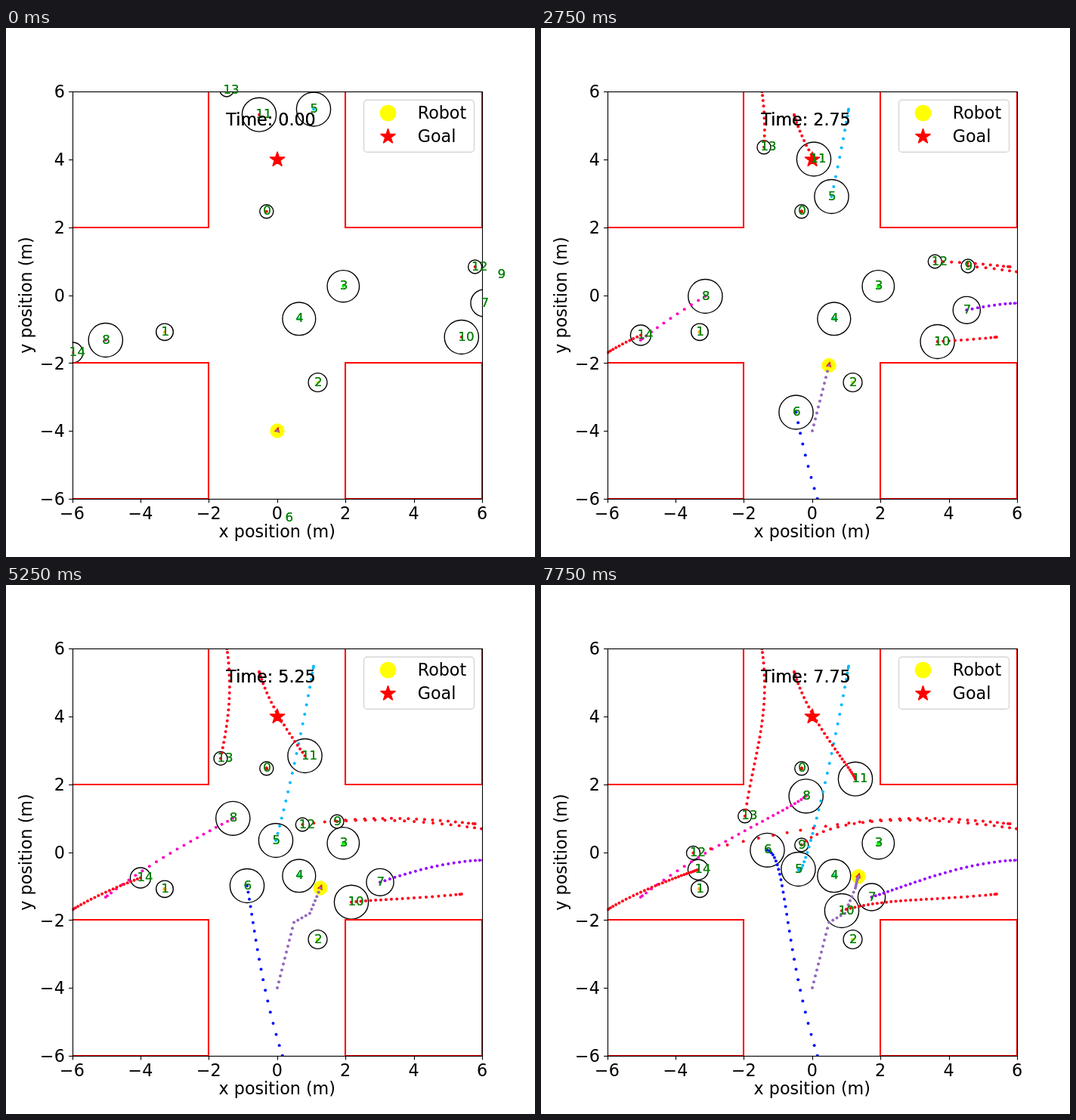
An HTML page with a canvas for the animation above (8 s loop, 700 px wide and 700 px high).

```html
<!DOCTYPE html>
<html lang="en">
<head>
<meta charset="utf-8">
<title>Crossroads simulation</title>
<style>
  html, body { margin: 0; width: 100%; height: 100%; overflow: hidden; background: #fff; }
  canvas { display: block; }
</style>
</head>
<body>
<canvas id="stage" width="700" height="700"></canvas>
<script>
const ctx = document.getElementById('stage').getContext('2d');
const STEP_MS = 250, STEPS = 32, TAU = Math.PI * 2;
const LEFT = 87.5, RIGHT = 630, TOP = 84, BOTTOM = 623;
const UNIT_X = (RIGHT - LEFT) / 12, UNIT_Y = (BOTTOM - TOP) / 12;
const px = x => LEFT + (x + 6) * UNIT_X;
const py = y => BOTTOM - (y + 6) * UNIT_Y;
const snap = v => Math.floor(v + 0.5) + 0.5;
const mix = (a, b, u) => a + (b - a) * u;
const sampleSteps = at => Array.from({ length: STEPS }, (_, step) => at(step));

// People speed up from rest, then follow a cubic through up to four waypoints.
const warp = step => step - 1.8 * (1 - Math.exp(-step / 1.8));
const KNOTS = [0, 11, 21, 31].map(warp);

function walk(points) {
  const knots = KNOTS.slice(0, points.length);
  return sampleSteps(step => {
    const weights = knots.map(k => knots.reduce(
      (w, other) => other === k ? w : w * (warp(step) - other) / (k - other), 1));
    return [0, 1].map(axis => points.reduce((sum, p, i) => sum + p[axis] * weights[i], 0));
  });
}

const people = [];
function addPerson(radius, ...points) {
  const hue = Math.min(people.length, 9) * 39.33;
  people.push({ radius, color: `hsl(${hue}, 100%, 50%)`, path: walk(points) });
}

addPerson(0.2, [344.8, 242.8]);
addPerson(0.25, [210, 402.3]);
addPerson(0.275, [412.5, 469]);
addPerson(0.47, [446.3, 341.7]);
addPerson(0.485, [387.8, 384.8]);
addPerson(0.5, [407, 107.5], [384.5, 223], [357, 338], [340.5, 376]);
addPerson(0.5, [374, 648], [337.5, 508.5], [319, 398], [299.5, 350.8]);
addPerson(0.4, [633, 364], [563.3, 373.3], [495, 393.3], [437.5, 413]);
addPerson(0.5, [131.8, 413], [217.4, 355], [300.3, 308.8], [350.7, 279.3]);
addPerson(0.2, [655, 326.5], [565, 315], [438, 313], [344.8, 344]);
addPerson(0.5, [602.8, 409], [524.6, 415], [457, 419.7], [398, 431]);
addPerson(0.5, [335, 114.7], [361, 173.5], [395.5, 226], [416, 256.7]);
addPerson(0.2, [620.6, 316], [521.3, 309], [392.3, 317], [201.5, 354.5]);
addPerson(0.2, [292, 82], [295, 157.8], [284, 229.5], [269.8, 305.8]);
addPerson(0.3, [88.3, 429.5], [132, 406.5], [178, 387.5], [208, 376.7]);

// The robot drives straight legs between timed stops.
const STOPS = [
  { step: 0, x: 359, y: 533 }, { step: 11, x: 381, y: 446.5 }, { step: 15, x: 402, y: 434.5 },
  { step: 21, x: 416, y: 401 }, { step: 25, x: 418.5, y: 390 }, { step: 31, x: 420, y: 385.7 },
];
const robot = sampleSteps(step => {
  const next = Math.max(1, STOPS.findIndex(stop => stop.step >= step));
  const a = STOPS[next - 1], b = STOPS[next];
  const u = (step - a.step) / (b.step - a.step);
  return { pos: [mix(a.x, b.x, u), mix(a.y, b.y, u)], heading: Math.atan2(b.y - a.y, b.x - a.x) };
});
const robotPath = robot.map(r => r.pos);

function line(color, width, ...points) {
  ctx.strokeStyle = color;
  ctx.lineWidth = width;
  ctx.beginPath();
  points.forEach(p => ctx.lineTo(...p));
  ctx.stroke();
}

function text(str, x, y, size = 22.22, align = 'left', color = '#000') {
  ctx.font = `${size}px "DejaVu Sans", sans-serif`;
  ctx.textAlign = align;
  ctx.fillStyle = color;
  ctx.fillText(str, x, y);
}

function dot(x, y, r, color) {
  ctx.fillStyle = color;
  ctx.beginPath();
  ctx.arc(x, y, r, 0, TAU);
  ctx.fill();
}

function star(x, y) {
  ctx.beginPath();
  for (let i = 0; i < 10; i++) {
    const r = i % 2 ? 3.98 : 10.42, a = i * TAU / 10;
    ctx.lineTo(x + r * Math.sin(a), y - r * Math.cos(a));
  }
  ctx.closePath();
  ctx.fillStyle = ctx.strokeStyle = '#f00';
  ctx.lineWidth = 1.39;
  ctx.lineJoin = 'bevel';
  ctx.fill();
  ctx.stroke();
  ctx.lineJoin = 'miter';
}

function trail(path, step, color) {
  path.slice(0, step + 1).forEach(p => dot(...p, 2, color));
}

function drawWalls() {
  const [west, east, north, south] = [268, 449, 264, 443];
  const red = (...points) => line('#f00', 2.08, ...points);
  red([LEFT, north], [west, north], [west, TOP]);
  red([RIGHT, TOP], [RIGHT, north], [east, north], [east, TOP]);
  red([LEFT, south], [west, south], [west, BOTTOM], [LEFT, BOTTOM]);
  red([RIGHT, south], [east, south], [east, BOTTOM], [RIGHT, BOTTOM], [RIGHT, south]);
}

function drawRobotArrow({ pos, heading }) {
  ctx.save();
  ctx.translate(...pos);
  ctx.rotate(heading);
  line('#f00', 1.4, [-2, -3], [4, 0], [-2, 3]);
  ctx.restore();
}

function drawAxes() {
  ctx.strokeStyle = '#000';
  ctx.lineWidth = 1.11;
  ctx.strokeRect(88.5, 84.5, 542, 539);
  for (let v = -6; v <= 6; v += 2) {
    const x = snap(px(v)), y = snap(py(v)), label = String(v).replace('-', '\u2212');
    line('#000', 1.11, [x, 623.5], [x, 628.4]);
    line('#000', 1.11, [88, y], [83.1, y]);
    text(label, px(v), 649.5, 22.22, 'center');
    text(label, 77.8, py(v) + 8.2, 22.22, 'right');
  }
  text('x position (m)', 358.75, 673.5, 22.22, 'center');
  ctx.save();
  ctx.translate(34, 353.5);
  ctx.rotate(-TAU / 4);
  text('y position (m)', 0, 0, 22.22, 'center');
  ctx.restore();
}

function drawLegend() {
  ctx.beginPath();
  ctx.roundRect(473.5, 95.3, 146, 69, 4.4);
  ctx.fillStyle = 'rgba(255,255,255,.8)';
  ctx.strokeStyle = 'rgba(204,204,204,.8)';
  ctx.lineWidth = 1.39;
  ctx.fill();
  ctx.stroke();
  dot(505.5, 112.5, 10.8, '#ff0');
  star(505.5, 143.7);
  text('Robot', 544.7, 120);
  text('Goal', 544.7, 151);
}

function draw(step) {
  ctx.fillStyle = '#fff';
  ctx.fillRect(0, 0, 700, 700);

  ctx.save();
  ctx.beginPath();
  ctx.rect(LEFT, TOP, RIGHT - LEFT, BOTTOM - TOP);
  ctx.clip();
  dot(...robotPath[step], 9.7, '#ff0');
  for (const { radius, path } of people) {
    ctx.strokeStyle = '#000';
    ctx.lineWidth = 1.39;
    ctx.beginPath();
    ctx.ellipse(...path[step], radius * UNIT_X, radius * UNIT_Y, 0, 0, TAU);
    ctx.stroke();
  }
  drawRobotArrow(robot[step]);
  drawWalls();
  trail(robotPath, step, '#9467bd');
  people.forEach(p => trail(p.path, step, p.color));
  star(px(0) + 0.3, py(4) + 0.3);
  ctx.restore();

  drawAxes();
  // Overlaid twice for the heavier look of these captions
  for (let pass = 0; pass < 2; pass++) {
    people.forEach(({ path }, i) => {
      const [x, y] = path[step];
      text(i, x - 4.5, y + 4.5, 16.67, 'left', '#008000');
    });
    text('Time: ' + (step * STEP_MS / 1000).toFixed(2), px(-1.5) + 0.4, py(5));
  }
  drawLegend();
}

function tick() {
  draw(Math.floor(performance.now() / STEP_MS) % STEPS);
  requestAnimationFrame(tick);
}
tick();
</script>
</body>
</html>
```
